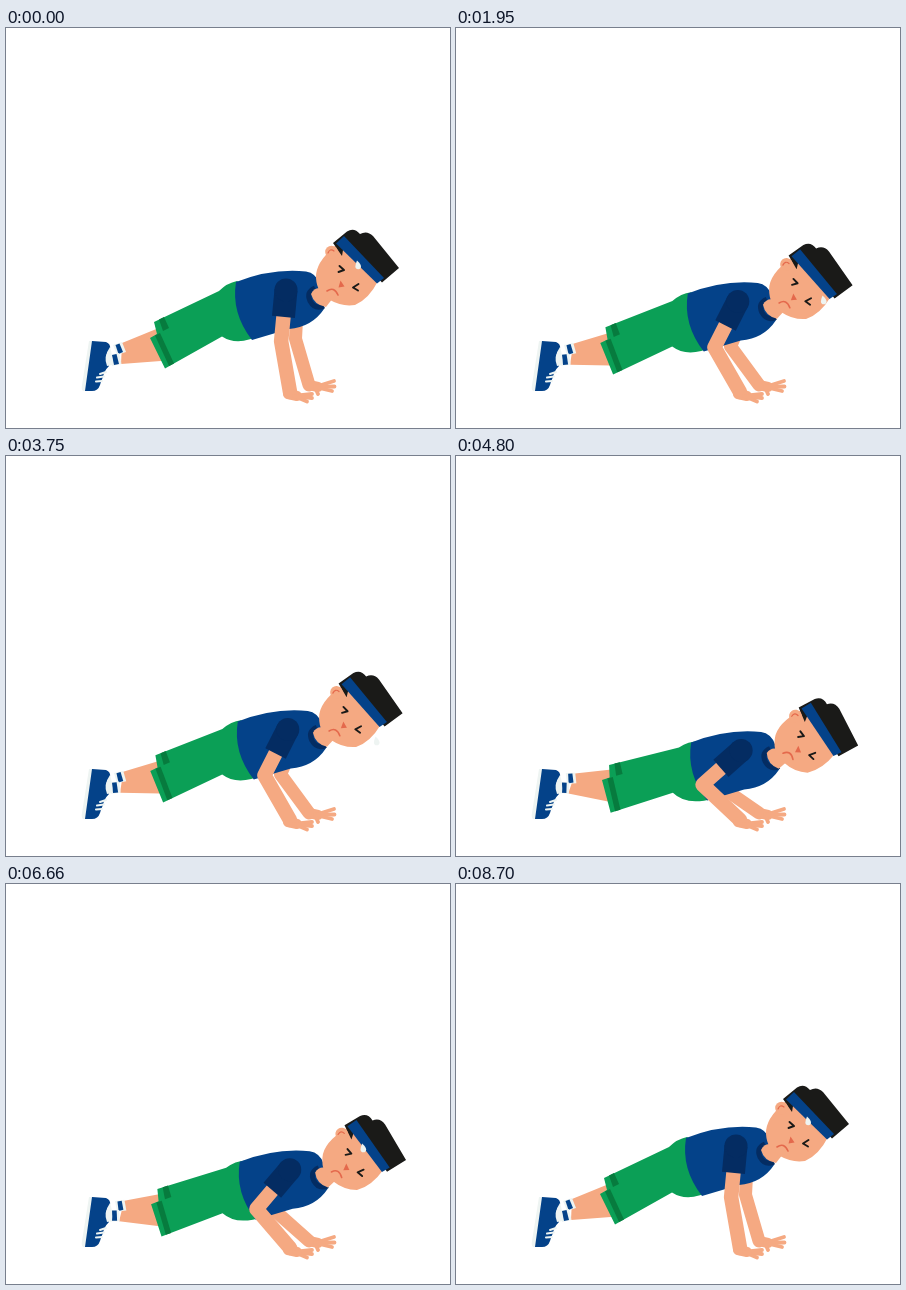
Recreate the animation shown at these times as an HTML page with a canvas. Size 444 by 400 pixels, loop 9.03 s.

```html
<!DOCTYPE html>
<html lang="en">
<head>
<meta charset="utf-8">
<title>Push-ups</title>
<style>
html, body { margin: 0; width: 100%; height: 100%; overflow: hidden; background: #fff; }
canvas { display: block; }
</style>
</head>
<body>
<canvas id="stage" width="444" height="400"></canvas>
<script>
const ctx = document.getElementById('stage').getContext('2d');
const SKIN = '#f5a982', BLUE = '#044289', NAVY = '#042c62', GREEN = '#0b9f56',
  DARK_GREEN = '#077b3e', BLACK = '#1a1a18', RED = '#e4694c', PALE = '#eef4f2';
const STEP = 30, STEPS = 301;

// Steps at which a sweat drop leaves the forehead, and its way past the nose: age, dx, dy
const DROPS = [0, 12, 24, 56, 80, 93, 114, 139, 174, 184, 204, 222, 234, 247, 263, 301];
const FALL = [[0, 17, -20], [2, 18, -17], [6, 20, -6], [9, 30, 2], [11, 33, 15], [15, 32, 22], [17, 31, 28]];

const clamp = x => Math.max(0, Math.min(1, x));
const ease = x => (1 - Math.cos(Math.PI * clamp(x))) / 2;

function fill(path, color) {
  ctx.fillStyle = color;
  ctx.fill(new Path2D(path));
}

function line(path, color, width, cap = 'round') {
  ctx.strokeStyle = color;
  ctx.lineWidth = width;
  ctx.lineCap = cap;
  ctx.lineJoin = 'round';
  ctx.stroke(new Path2D(path));
}

// Draws a part moved by (dx, dy) and turned by deg around (x, y)
function part(x, y, deg, dx, dy, draw) {
  ctx.save();
  ctx.translate(x + dx, y + dy);
  ctx.rotate(deg * Math.PI / 180);
  ctx.translate(-x, -y);
  draw();
  ctx.restore();
}

// Elbow of an arm with two equal bones, bent to the left
function elbow(s, w, bone) {
  const dx = w[0] - s[0], dy = w[1] - s[1], len = Math.hypot(dx, dy);
  const out = Math.sqrt(Math.max(0, bone * bone - len * len / 4));
  return [(s[0] + w[0]) / 2 - dy / len * out, (s[1] + w[1]) / 2 + dx / len * out];
}

function arm(s, w, bone, width) {
  const e = elbow(s, w, bone);
  line(`M${s}L${e}L${w}`, SKIN, width);
  return e;
}

function shoe() {
  fill('M83 313L88 313L83 363L77 363Q75 361 76 357Z', PALE);
  fill('M86 313L100 314Q105 316 104 321Q99 327 100 332L103 338Q98 343 97 349Q95 353 94 357Q92 363 86 363L79 363Z', BLUE);
  fill('M104 319Q107 328 106 337L101 338Q97 329 104 319Z', PALE);
  line('M100 344L94 346M98 348.5L91 349.5M96 353L90 353.5', PALE, 2);
}

function shin() {
  fill('M116 315L165 295L168 332L115 336Z', SKIN);
  fill('M107 317L116 314L120 324L111 327Z', PALE);
  fill('M109.500 317L113.500 315.500L117 324L112.500 326Z', BLUE);
  fill('M104 327L113 325L115.500 336L106 338Z', PALE);
  fill('M106 327L110.500 326L113 336L108 337Z', BLUE);
}

function shorts() {
  fill('M148 294L213 263Q221 255 231 253L262 270L257 306Q232 319 216 308.500L159 340.500L144 310L151 306Z', GREEN);
  fill('M153 291.500L158 289L163 300L157 303Z', DARK_GREEN);
  fill('M149 307.500L154 305L168 335.500L163 338Z', DARK_GREEN);
}

function torso() {
  fill('M230 254Q266 240 300 243.500Q310 245 314 256L318 281Q306 299 283 301L246 312Q225 285 230 254Z', BLUE);
  line('M309 260Q300 264 304 273Q309 282 318 278', NAVY, 5, 'butt');
}

function head() {
  fill('M305 266Q308 259 315 260L327 270L320 279Q308 277 305 266Z', SKIN);
  fill('M329 218Q309 235 310 250Q311 266 324 272Q336 279 349 277Q363 271 372 253L336 214Z', SKIN);
  fill('M327 215L341 203.500Q348 199 354 206Q361 202 367 208L393 240L376 254.500L338 216L336 228Z', BLACK);
  fill('M330 215.500L338 208L378 250L371 255.500Z', BLUE);
  ctx.fillStyle = SKIN;
  ctx.beginPath();
  ctx.arc(325.5, 224, 6.3, 0, 7);
  ctx.fill();
  line('M322 225Q324 220 328 223', RED, 1.2);
  line('M333.500 238L338 242L332.500 244M352.500 256L347 259.500L352 262.500', BLACK, 1.9);
  fill('M334.500 252.500L338.500 258.500L332.500 259.500Z', RED);
  line('M321 263Q328 258 332 267', RED, 1.6);
}

function hand(x, y, tips) {
  line(`M${x - 2} ${y}L${x + 7} ${y + 2}`, SKIN, 10);
  for (const [tx, ty] of tips) line(`M${x + 4} ${y + 2}L${tx} ${ty}`, SKIN, 3.8);
}

function drop(age, nose) {
  if (age < -14 || age > 17) return;
  const a = Math.max(0, age);
  const i = Math.min(FALL.length - 2, FALL.findLastIndex(k => k[0] <= a));
  const [p, q] = [FALL[i], FALL[i + 1]];
  const k = (a - p[0]) / (q[0] - p[0]);
  const size = clamp((age + 14) / 3);
  ctx.save();
  ctx.translate(nose[0] + p[1] + (q[1] - p[1]) * k, nose[1] + p[2] + (q[2] - p[2]) * k);
  ctx.scale(size, size);
  ctx.globalAlpha = clamp((18 - age) / 4);
  fill('M-1 -4.500Q3 -1 3 1.500A2.800 2.800 0 0 1 -2.600 1.500Q-2.500 -1 -1 -4.500Z', PALE);
  ctx.restore();
}

function draw(n) {
  const phase = n % 60;
  const d = phase < 15 ? ease(phase / 15) : 1 - ease((phase - 34.4) / 15.6);
  const dx = 7.2 * d, dy = 45.5 * d, turn = 16.5 * d;

  ctx.fillStyle = '#fff';
  ctx.fillRect(0, 0, 444, 400);

  arm([292 + dx, 263 + dy], [303, 357], 48, 13);
  hand(305, 357, [[328, 353], [328.5, 358.5], [326, 363], [312, 366]]);

  part(108, 327, 22 * d, 0, 0, shin);
  shoe();
  part(235, 285, 16 * d, dx, dy, shorts);
  part(0, 0, 0, dx, dy, torso);
  part(313, 268, turn, dx, dy, head);

  const r = turn * Math.PI / 180, c = Math.cos(r), s = Math.sin(r);
  const nose = [313 + dx + 22 * c + 11 * s, 268 + dy + 22 * s - 11 * c];
  for (const start of DROPS) drop(n - start, nose);

  const shoulder = [280 + dx, 262 + dy];
  const e = arm(shoulder, [284, 364], 51.5, 14.5);
  hand(284, 366, [[306, 366], [306, 370], [301, 373.5]]);
  const len = Math.hypot(e[0] - shoulder[0], e[1] - shoulder[1]);
  const cuff = shoulder.map((v, i) => v + (e[i] - v) * 27 / len);
  line(`M${shoulder}L${cuff}`, NAVY, 23, 'butt');
  ctx.fillStyle = NAVY;
  ctx.beginPath();
  ctx.arc(...shoulder, 11.5, 0, 7);
  ctx.fill();
}

function tick() {
  draw(Math.floor(performance.now() / STEP) % STEPS);
  requestAnimationFrame(tick);
}
tick();
</script>
</body>
</html>
```
